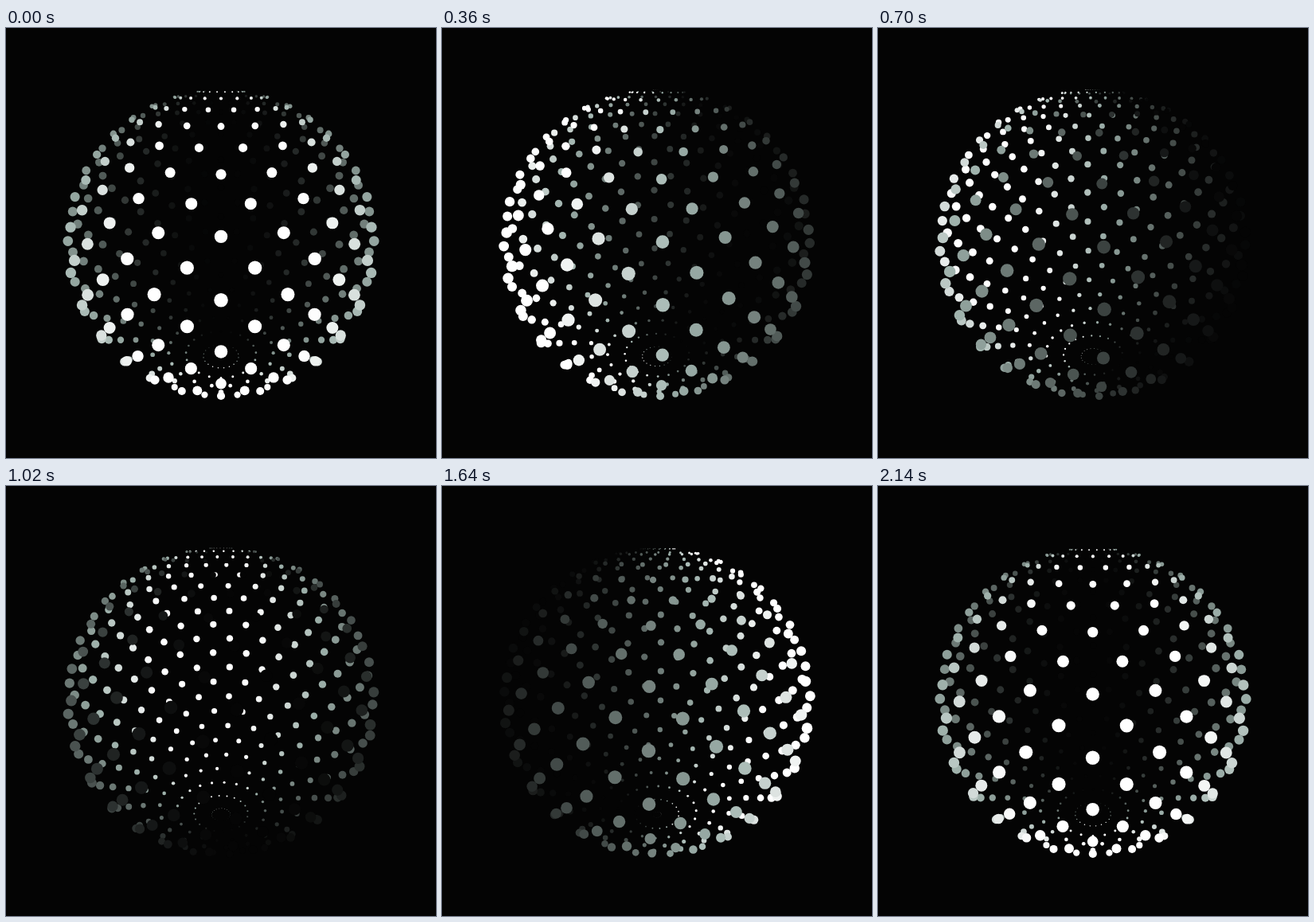
Write an HTML page with a canvas that moves like this. It is 540 by 540 pixels and loops after 2.16 s.

```html
<!DOCTYPE html>
<html>
<head>
<meta charset="utf-8">
<style>
  html, body { margin: 0; width: 100%; height: 100%; overflow: hidden; background: #040404; }
  canvas { display: block; }
</style>
</head>
<body>
<canvas id="stage" width="540" height="540"></canvas>
<script>
const ctx = document.getElementById('stage').getContext('2d');
const LOOP = 2160, MID = 270;
const ROWS = 22, COLS = 20;
const CAMERA = MID / Math.tan(Math.PI / 6);
const RADIUS = 178, DOT = 5.6, TILT = 0.4;
const SIN = Math.sin(TILT), COS = Math.cos(TILT);
const DARK = [4, 4, 4], TEAL = [158, 177, 171], WHITE = [255, 255, 255];

function mix(a, b, t) {
  return `rgb(${a.map((v, i) => Math.round(v + (b[i] - v) * t))})`;
}

// Brightness depends only on the angle around the axis from the light.
function shade(angle) {
  const b = (1 + Math.cos(angle)) / 2;
  return b < 0.7 ? mix(DARK, TEAL, b / 0.7) : mix(TEAL, WHITE, Math.min(1, (b - 0.7) / 0.25));
}

function makeDot(row, col, p) {
  const polar = (row + p) * Math.PI / ROWS;
  const lon = (col + (row + p) / 2) * 2 * Math.PI / COLS;
  const ring = Math.sin(polar), up = Math.cos(polar), front = ring * Math.cos(lon);
  const z = RADIUS * (front * COS + up * SIN);
  const scale = CAMERA / (CAMERA - z);
  return {
    x: MID + RADIUS * ring * Math.sin(lon) * scale,
    y: MID - RADIUS * (up * COS - front * SIN) * scale,
    z,
    r: DOT * ring * scale,
    color: shade(lon + 2 * Math.PI * p)
  };
}

function draw(now) {
  const p = now % LOOP / LOOP;
  const dots = [];
  for (let row = 0; row < ROWS; row++)
    for (let col = 0; col < COLS; col++) dots.push(makeDot(row, col, p));
  dots.sort((a, b) => a.z - b.z);

  ctx.fillStyle = '#040404';
  ctx.fillRect(0, 0, 540, 540);
  for (const d of dots) {
    ctx.fillStyle = d.color;
    ctx.beginPath();
    ctx.arc(d.x, d.y, d.r, 0, 2 * Math.PI);
    ctx.fill();
  }
}

const start = performance.now();
function tick() {
  draw(performance.now() - start);
  requestAnimationFrame(tick);
}
tick();
</script>
</body>
</html>
```
